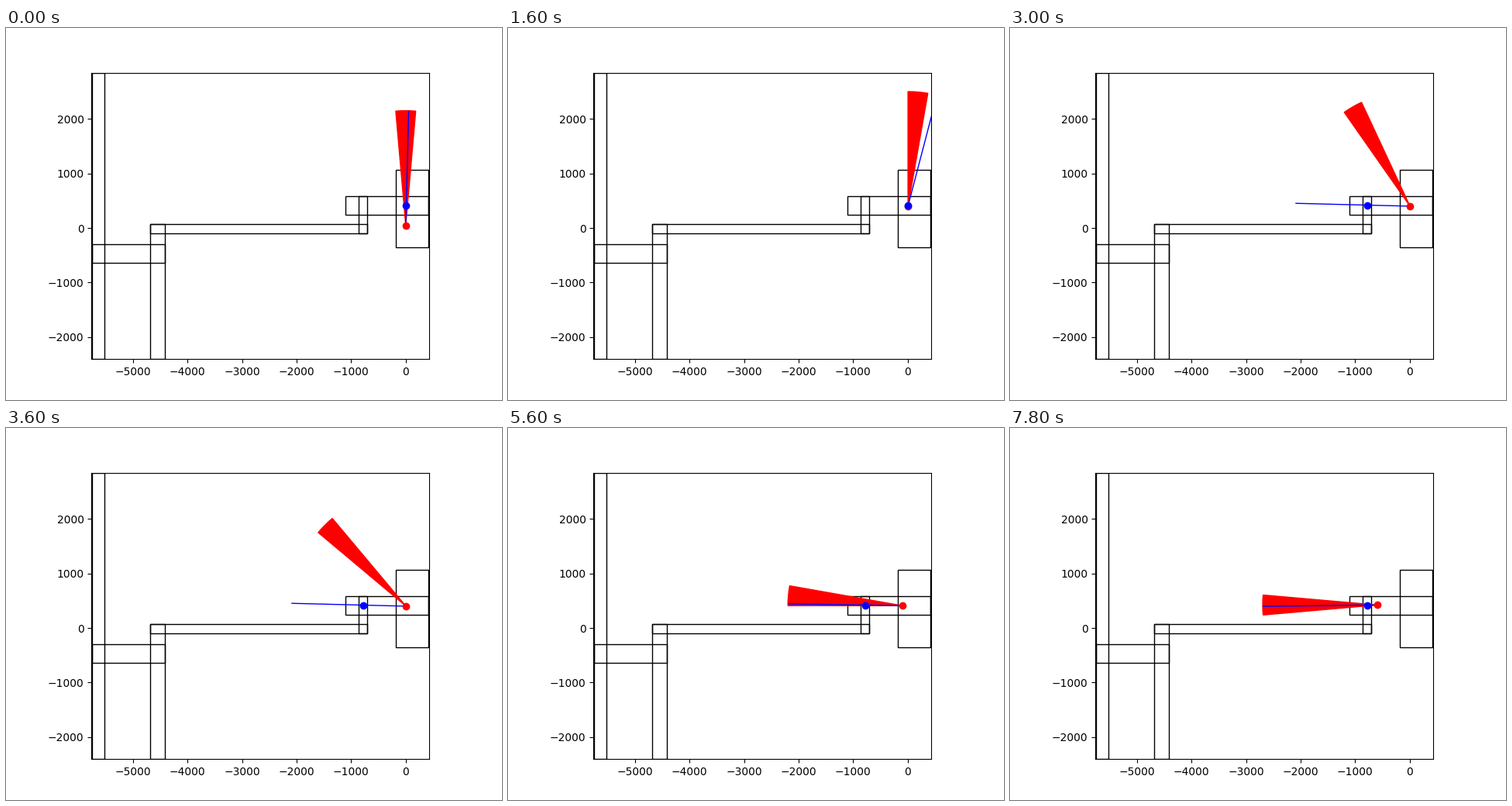
A matplotlib script for the animation above (8000 ms loop, 640 by 480 pixels).

```python
import math

import matplotlib.pyplot as plt
from matplotlib.animation import FuncAnimation
from matplotlib.patches import Rectangle, Wedge

FRAMES, INTERVAL = 40, 200
REACH = 2100          # length of the view cone and the bearing line
HALF_ANGLE = 5        # half opening of the cone, degrees
STEP, TURN = 50, 5    # travel and rotation per tick
LEFT, RIGHT, BOTTOM, TOP = -5759, 425, -2402, 2847


def span(center, width):
    return center - width / 2, center + width / 2


# Columns are x spans and rows are y spans; they overlap where they meet.
shaft, lane, link, room = (span(-5638, 227), span(-4552, 270),
                           span(-780, 156), span(114, 596))
low, middle, high = span(-465, 341), span(-11, 170), span(419.5, 341)
BOXES = [
    (shaft, (BOTTOM, TOP)),
    ((shaft[0], lane[1]), low),
    (lane, (BOTTOM, middle[1])),
    ((lane[0], link[1]), middle),
    (link, (middle[0], high[1])),
    ((link[0] - 250, room[1]), high),
    (room, span(358, 1421)),
]

# Both goals lie on the centre line of the upper row.
GOALS = [(9.5, sum(high) / 2), (sum(link) / 2, sum(high) / 2)]


def bearing(x, y, goal):
    return math.degrees(math.atan2(goal[1] - y, goal[0] - x))


def ahead(x, y, degrees, distance):
    a = math.radians(degrees)
    return x + distance * math.cos(a), y + distance * math.sin(a)


def drive():
    """Turn towards the goal when it is off course, otherwise move ahead."""
    x, y, heading = 0, 50, 90
    goals = iter(GOALS)
    goal = next(goals)
    poses = []
    for _ in range(FRAMES):
        poses.append((x, y, heading, goal))
        if math.dist((x, y), goal) < STEP:
            goal = next(goals, goal)
        off = (bearing(x, y, goal) - heading + 180) % 360 - 180
        if abs(off) > HALF_ANGLE:
            heading += math.copysign(TURN, off)
        else:
            x, y = ahead(x, y, heading, STEP)
    return poses


POSES = drive()

fig, ax = plt.subplots(figsize=(6.4, 4.8), dpi=100)
ax.set_aspect("equal")
ax.set_xlim(LEFT, RIGHT)
ax.set_ylim(BOTTOM, TOP)
ax.set_xticks(range(-5000, 1, 1000))
ax.set_yticks(range(-2000, 2001, 1000))

for (x0, x1), (y0, y1) in BOXES:
    ax.add_patch(Rectangle((x0, y0), x1 - x0, y1 - y0, fill=False))

cone = ax.add_patch(Wedge((0, 0), REACH, 85, 95, color="red"))
sight, = ax.plot([], [], color="blue", linewidth=1, solid_capstyle="butt")
robot, = ax.plot([], [], "o", color="red")
target, = ax.plot([], [], "o", color="blue")


def update(i):
    x, y, heading, goal = POSES[i]
    cone.set_center((x, y))
    cone.set_theta1(heading - HALF_ANGLE)
    cone.set_theta2(heading + HALF_ANGLE)
    end = ahead(x, y, bearing(x, y, goal), REACH)
    sight.set_data([x, end[0]], [y, end[1]])
    robot.set_data([x], [y])
    target.set_data([goal[0]], [goal[1]])
    return cone, sight, robot, target


anim = FuncAnimation(fig, update, frames=FRAMES, interval=INTERVAL,
                     repeat=True, repeat_delay=0)
plt.show()
```
